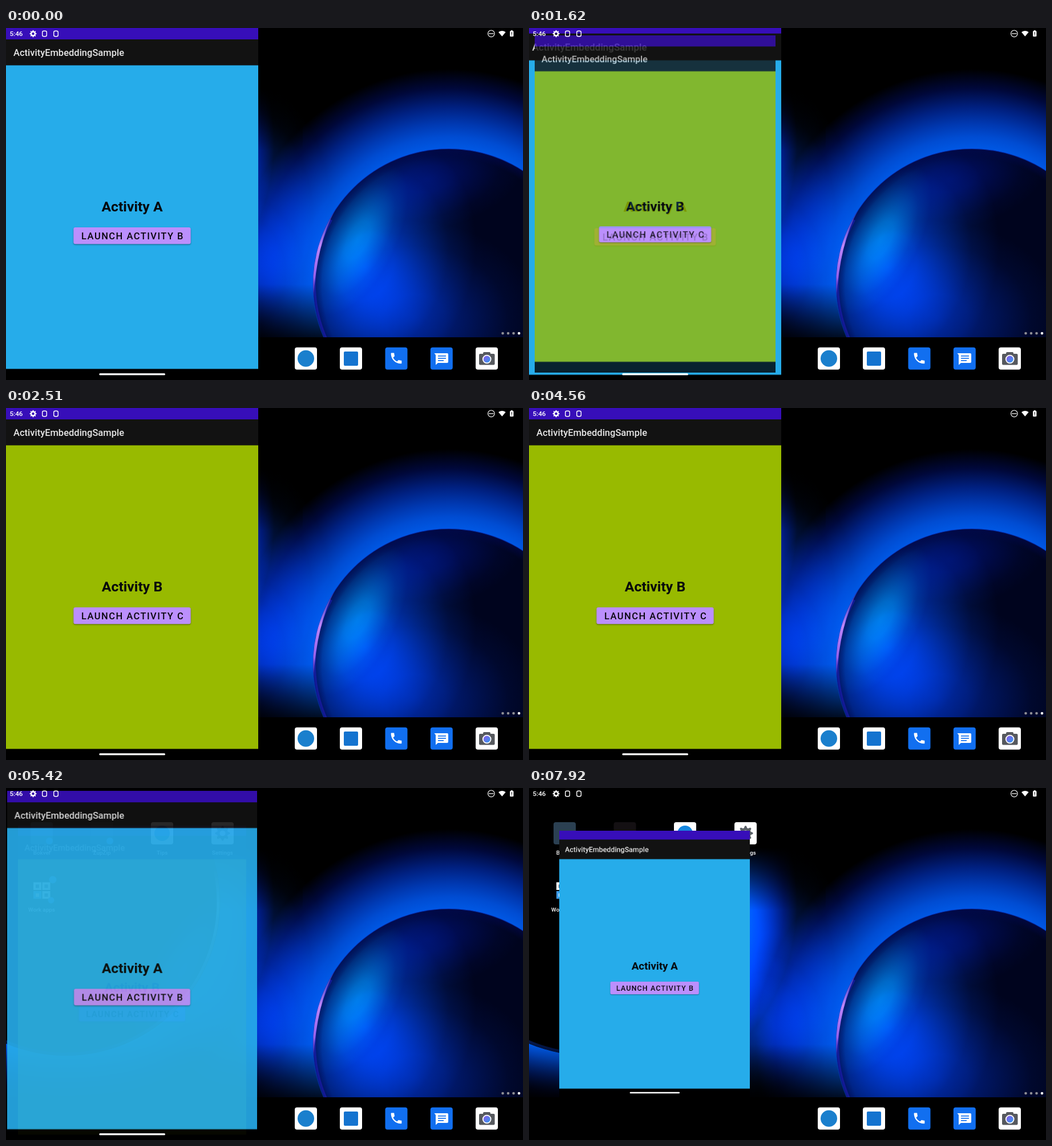
These frames come from a looping animation (906x618 px, 8000 ms). An HTML page with a canvas:

```html
<!DOCTYPE html>
<html lang="en">
<head>
<meta charset="utf-8">
<title>Activity transitions</title>
<style>
html, body { margin: 0; width: 906px; height: 618px; overflow: hidden; background: #000; }
canvas { display: block; }
</style>
</head>
<body>
<canvas id="stage" width="906" height="618"></canvas>
<script>
const W = 906, H = 618, PANE = 442, LOOP = 8000, TAU = Math.PI * 2;
const ctx = document.getElementById('stage').getContext('2d');
const clamp = v => Math.max(0, Math.min(1, v));

function layer(w, h, paint) {
  const c = document.createElement('canvas');
  c.width = w;
  c.height = h;
  paint(c.getContext('2d'));
  return c;
}

function rect(g, x, y, w, h, color) {
  g.fillStyle = color;
  g.fillRect(x, y, w, h);
}

function box(g, x, y, w, h, r, color) {
  g.fillStyle = color;
  g.beginPath();
  g.roundRect(x, y, w, h, r);
  g.fill();
}

function disc(g, x, y, r, color) {
  g.fillStyle = color;
  g.beginPath();
  g.arc(x, y, r, 0, TAU);
  g.fill();
}

function text(g, str, x, y, size, weight, color, align = 'left') {
  g.font = `${weight} ${size}px Roboto, sans-serif`;
  g.fillStyle = color;
  g.textAlign = align;
  g.fillText(str, x, y);
}

function gear(g, x, y, r, hole, color) {
  g.fillStyle = color;
  g.beginPath();
  for (let i = 0; i < 32; i++) {
    const a = (i - 0.5) / 32 * TAU, d = i % 4 < 2 ? r : r * 0.74;
    g.lineTo(x + d * Math.cos(a), y + d * Math.sin(a));
  }
  g.closePath();
  g.moveTo(x + hole, y);
  g.arc(x, y, hole, 0, TAU, true);
  g.fill('evenodd');
}

// Soft elliptical light
function glow(g, x, y, rx, ry, deg, rgb, peak) {
  g.save();
  g.translate(x, y);
  g.rotate(deg * Math.PI / 180);
  g.scale(rx, ry);
  const f = g.createRadialGradient(0, 0, 0, 0, 0, 1);
  [1, 0.85, 0.5, 0.16, 0].forEach((k, i) => f.addColorStop(i / 4, `rgba(${rgb},${k * peak})`));
  g.fillStyle = f;
  g.fillRect(-1, -1, 2, 2);
  g.restore();
}

// Ring of light around a sphere
function halo(g, x, y, r, reach) {
  const f = g.createRadialGradient(x, y, r, x, y, r + reach);
  [[0, '#0058e4'], [0.15, '#004cd2'], [0.32, '#0038b0'], [0.52, '#002080'], [0.76, '#00083a'], [1, '#000']]
    .forEach(stop => f.addColorStop(...stop));
  g.fillStyle = f;
  g.fillRect(0, 0, W, H);
}

// Darkens a column from y0 to y1
function fade(g, w, y0, a0, y1, a1) {
  const f = g.createLinearGradient(0, y0, 0, y1);
  f.addColorStop(0, `rgba(0,0,0,${a0})`);
  f.addColorStop(1, `rgba(0,0,0,${a1})`);
  g.fillStyle = f;
  g.fillRect(0, 0, w, H);
}

function leftSphere(g) {
  const x = 105, y = 200, r = 270;
  disc(g, x, y, r, '#000');
  g.save();
  g.beginPath();
  g.arc(x, y, r, 0, TAU);
  g.clip();
  glow(g, 310, 320, 60, 170, 30, '0,70,210', 0.6);
  g.restore();
  const f = g.createLinearGradient(0, 140, 0, 470);
  f.addColorStop(0, 'rgba(120,190,255,0)');
  f.addColorStop(0.2, 'rgba(120,190,255,.85)');
  f.addColorStop(0.6, 'rgba(60,130,255,.6)');
  f.addColorStop(1, 'rgba(0,50,190,.3)');
  g.strokeStyle = f;
  g.lineWidth = 5;
  g.beginPath();
  g.arc(x, y, r - 3, -0.3, 2);
  g.stroke();
}

function rightSphere(g) {
  const x = 776, y = 450, r = 238;
  g.save();
  g.beginPath();
  g.arc(x, y, r, 0, TAU);
  g.clip();
  rect(g, 500, 200, 406, 400, '#00041e');
  g.globalCompositeOperation = 'lighter';
  glow(g, 630, 420, 185, 240, 22, '0,58,180', 0.92);
  glow(g, 715, 510, 220, 170, 0, '0,34,130', 0.75);
  glow(g, 740, 265, 170, 90, -12, '0,12,80', 0.8);
  glow(g, 616, 372, 66, 145, 27, '0,78,62', 0.95);
  g.globalCompositeOperation = 'source-over';
  const s = g.createRadialGradient(x, y, r - 16, x, y, r);
  s.addColorStop(0, 'rgba(2,8,80,0)');
  s.addColorStop(1, 'rgba(2,8,80,.6)');
  g.fillStyle = s;
  g.fillRect(500, 200, 406, 400);
  g.restore();

  g.lineWidth = 1.5;
  g.strokeStyle = 'rgba(10,62,215,.5)';
  g.beginPath();
  g.arc(x, y, r, Math.PI * 0.86, Math.PI * 1.75);
  g.stroke();
  g.lineWidth = 4;
  g.strokeStyle = 'rgba(35,30,190,.55)';
  g.beginPath();
  g.arc(x, y, r - 3, Math.PI * 0.86, Math.PI * 1.16);
  g.stroke();

  const f = g.createLinearGradient(0, 318, 0, 478);
  f.addColorStop(0, 'rgba(110,100,245,.3)');
  f.addColorStop(0.4, 'rgba(190,135,250,1)');
  f.addColorStop(0.75, 'rgba(165,105,245,.9)');
  f.addColorStop(1, 'rgba(90,50,220,.1)');
  g.fillStyle = f;
  g.beginPath();
  g.arc(x, y, r, Math.PI * 0.965, Math.PI * 1.184);
  g.quadraticCurveTo(544, 380, 539, 475);
  g.fill();
}

function wallpaper(g) {
  rect(g, 0, 0, W, H, '#000');
  g.globalCompositeOperation = 'lighter';
  halo(g, 105, 200, 270, 95);
  glow(g, 430, 310, 140, 230, -8, '0,52,180', 0.6);
  glow(g, 400, 430, 120, 140, 0, '0,48,165', 0.7);
  halo(g, 776, 450, 238, 140);
  g.globalCompositeOperation = 'source-over';
  fade(g, 520, 105, 1, 215, 0);
  fade(g, 600, 450, 0, 555, 0.95);
  leftSphere(g);
  rightSphere(g);
  rect(g, 0, 543, W, H - 543, '#000');
}

function tile(g, cx, cy, color) {
  box(g, cx - 19.5, cy - 19.5, 39, 39, 4, color);
}

function apps(g) {
  const label = (s, x, y) => text(g, s, x, y, 9.9, 500, '#fff', 'center');
  tile(g, 62.5, 79.5, '#2b4052');
  disc(g, 76, 93, 6, '#1d78e6');
  tile(g, 168, 79.5, '#141013');
  disc(g, 182, 93, 6, '#1d78e6');
  tile(g, 273.5, 79.5, '#fff');
  disc(g, 273.5, 79.5, 13.5, '#1487e0');
  tile(g, 379.5, 79.5, '#fff');
  gear(g, 379.5, 79.5, 13, 5, '#5b6168');
  ['Bokvel', 'ZupZip', 'Tips', 'Settings'].forEach((s, i) => label(s, 62.5 + i * 105.6, 116.5));

  for (let i = 0; i < 4; i++) {
    const x = 48 + i % 2 * 15.5, y = 165.5 + (i >> 1) * 15.5;
    rect(g, x, y, 14, 13.5, i === 2 ? '#3d9be8' : '#fff');
    rect(g, x + 4, y + 4, 6, 6, i === 2 ? '#fff' : '#3a4a60');
  }
  disc(g, 82, 161, 6.5, '#1d78e6');
  disc(g, 79, 197, 5.5, '#1d78e6');
  label('Work apps', 62.5, 216.5);
}

function dock(g) {
  const y = 580.3, blue = '#116ff0';
  [525.5, 604.5, 684, 763.3, 842.5].forEach((x, i) => tile(g, x, y, i === 2 || i === 3 ? blue : '#fff'));
  disc(g, 525.5, y, 14.5, '#1a7fcd');
  box(g, 592, 568, 25, 25, 2, '#1473cf');

  g.save();
  g.translate(671.5, 567.5);
  g.scale(1.04, 1.04);
  g.fillStyle = '#fff';
  g.fill(new Path2D('M6.6 10.8c1.4 2.8 3.8 5.1 6.6 6.6l2.2-2.2c.3-.3.7-.4 1-.2 1.1.4 2.3.6 3.6.6.6 0 1 .4 1 1V20c0 .6-.4 1-1 1-9.4 0-17-7.6-17-17 0-.6.4-1 1-1h3.5c.6 0 1 .4 1 1 0 1.2.2 2.4.6 3.6.1.3 0 .7-.3 1z'));
  g.restore();

  box(g, 753, 571, 22, 17, 2, '#fff');
  g.beginPath();
  g.moveTo(750.5, 571);
  g.lineTo(757, 571);
  g.lineTo(757, 588);
  g.lineTo(753, 591.5);
  g.lineTo(753, 574);
  g.fill();
  [575, 579, 583].forEach((ly, i) => rect(g, 757, ly, i === 2 ? 10 : 14, 1.7, blue));

  box(g, 836, 569, 13, 7, 2, '#56595e');
  box(g, 829, 572, 27.5, 19.5, 2, '#56595e');
  disc(g, 842.7, 581.5, 7.8, '#fff');
  const lens = g.createLinearGradient(837, 576, 848, 588);
  lens.addColorStop(0, '#8a5be8');
  lens.addColorStop(1, '#2f9bf0');
  disc(g, 842.7, 581.5, 6, lens);

  [870.5, 880, 889.5, 899].forEach((x, i) => disc(g, x, 536, 2.3, i === 3 ? '#fff' : '#8e8e94'));
}

const home = layer(W, H, g => {
  wallpaper(g);
  apps(g);
  dock(g);
});

function activity(name, next, color) {
  return layer(PANE, H, g => {
    rect(g, 0, 0, PANE, H, '#000');
    rect(g, 0, 0, PANE, 20, '#370eb9');
    rect(g, 0, 20, PANE, 45.5, '#121212');
    rect(g, 0, 65.5, PANE, 533, color);
    text(g, 'ActivityEmbeddingSample', 12.9, 48.8, 16.5, 500, '#e6e6e6');
    text(g, 'Activity ' + name, 221, 322, 24.75, 700, '#06080c', 'center');
    g.shadowColor = 'rgba(0,0,0,.4)';
    g.shadowBlur = 2.5;
    g.shadowOffsetY = 1.3;
    box(g, 118.3, 350, 205.4, 29.2, 3.3, '#bb8ffd');
    g.shadowColor = 'transparent';
    g.letterSpacing = '1.47px';
    text(g, 'LAUNCH ACTIVITY ' + next, 222, 371, 16.5, 500, '#08060c', 'center');
  });
}

const actA = activity('A', 'B', '#26acea');
const actB = activity('B', 'C', '#98ba00');

function handle(g) {
  box(g, 163.3, 606.3, 115.7, 3.3, 1.6, '#fff');
}

function statusBar(g) {
  text(g, '5:46', 6.4, 14.2, 11.7, 500, '#fff');
  gear(g, 47.5, 10, 6.2, 2.2, '#fff');
  g.strokeStyle = '#fff';
  g.lineWidth = 1.4;
  g.beginPath();
  g.roundRect(63.7, 5.2, 7.6, 9.6, 2.5);
  g.roundRect(83.7, 5.2, 7.6, 9.6, 2.5);
  g.stroke();
  g.lineWidth = 1.2;
  g.beginPath();
  g.arc(850.3, 9.8, 5.8, 0, TAU);
  g.moveTo(846, 9.8);
  g.lineTo(854.6, 9.8);
  g.stroke();
  g.fillStyle = '#fff';
  g.beginPath();
  g.moveTo(869.3, 14.8);
  g.lineTo(863, 7.3);
  g.quadraticCurveTo(869.3, 2.6, 875.6, 7.3);
  g.fill();
  box(g, 883, 5.3, 6.4, 9.8, 1, '#fff');
  rect(g, 884.8, 4, 2.8, 2, '#fff');
  rect(g, 885.6, 7.4, 1.3, 3.2, '#111');
  rect(g, 885.6, 11.6, 1.3, 1.3, '#111');
}

// Runs paint inside the pane, scaled about its centre
function inPane(scale, dy, alpha, paint) {
  ctx.save();
  ctx.beginPath();
  ctx.rect(0, 0, PANE, H);
  ctx.clip();
  ctx.globalAlpha = alpha;
  ctx.translate(PANE / 2, H / 2 + dy);
  ctx.scale(scale, scale);
  ctx.translate(-PANE / 2, -H / 2);
  paint(ctx);
  ctx.restore();
}

const show = (act, scale = 1, dy = 0, alpha = 1) => inPane(scale, dy, alpha, g => g.drawImage(act, 0, 0));

// Fast start, long tail: two joined cubic curves
function easeOpen(x) {
  if (x <= 0 || x >= 1) return clamp(x);
  const bez = (p, u) => {
    const v = 1 - u;
    return p[0] * v * v * v + 3 * p[1] * u * v * v + 3 * p[2] * u * u * v + p[3] * u * u * u;
  };
  const first = x < 1 / 6;
  const px = first ? [0, 0.05, 0.1333, 1 / 6] : [1 / 6, 0.2083, 0.25, 1];
  const py = first ? [0, 0, 0.06, 0.4] : [0.4, 0.82, 1, 1];
  let lo = 0, hi = 1;
  for (let i = 0; i < 24; i++) {
    const mid = (lo + hi) / 2;
    if (bez(px, mid) < x) lo = mid; else hi = mid;
  }
  return bez(py, lo);
}

// Windows move in visible steps: [from, to, step]
const spans = [[1200, 1970, 70], [4560, 4690, 130], [4690, 5390, 100], [5390, 5420, 130], [5420, 5940, 130]];
function snap(t) {
  const s = spans.find(([a, b]) => t >= a && t < b);
  return s ? s[0] + Math.floor((t - s[0]) / s[2]) * s[2] : t;
}

const OPEN = 1531, BACK = 4600, COMMIT = 5300, LEAVE = 7920;
const MIN_SCALE = 0.907, DRAG = 37;

function openB(t) {
  const e = t - OPEN, p = easeOpen(e / 400);
  show(actA, 1 + 0.05 * p);
  show(actB, 0.85 + 0.15 * p, 0, clamp((e - 49) / 50));
}

function dragB(t) {
  const p = 0.8 * Math.sin(clamp((t - BACK) / (COMMIT - BACK)) * Math.PI / 2);
  show(actB, 1 - (1 - MIN_SCALE) * p, DRAG * p * p);
}

function returnA(t) {
  const e = t - COMMIT, rest = e > 400 ? 0 : Math.exp(-e / 47);
  show(actB, MIN_SCALE, DRAG, clamp(1 - e / 230));
  show(actA, 1 - 0.1 * rest, DRAG * rest, clamp(e / 132));
}

function draw(now) {
  const t = snap(now);
  ctx.drawImage(home, 0, 0);
  if (t < OPEN) show(actA);
  else if (t < OPEN + 400) openB(t);
  else if (t < BACK) show(actB);
  else if (t < COMMIT) dragB(t);
  else if (t < LEAVE) returnA(t);
  else inPane(0.756, 0, 1, g => {
    g.translate(-1, 0);
    g.drawImage(actA, 0, 0);
    handle(g);
  });
  if (t < LEAVE) handle(ctx);
  statusBar(ctx);
}

ctx.imageSmoothingQuality = 'high';
const start = performance.now();
function tick() {
  draw((performance.now() - start) % LOOP);
  requestAnimationFrame(tick);
}
tick();
</script>
</body>
</html>
```
